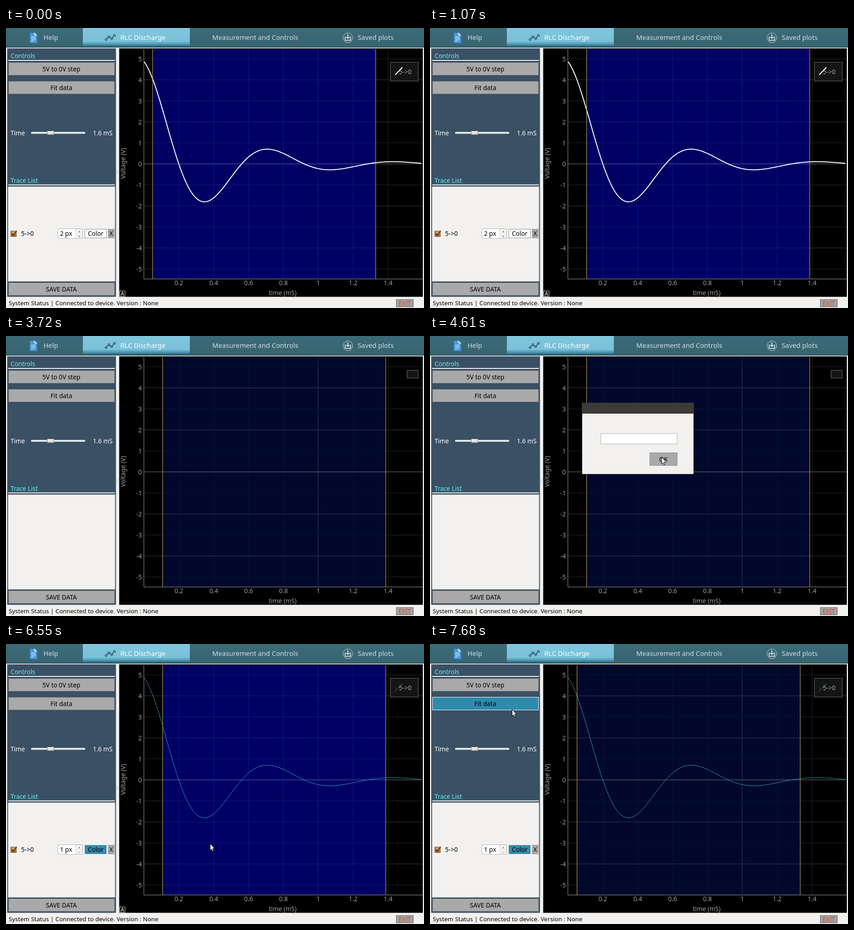
An HTML page with a canvas that plays this animation: 914 px wide and 613 px high, repeating every 8000 ms.

```html
<!DOCTYPE html>
<html lang="en">
<head>
<meta charset="utf-8">
<title>RLC Discharge</title>
<style>
html, body { margin: 0; width: 100%; height: 100%; overflow: hidden; background: #f2f1f0; }
canvas { display: block; width: 914px; height: 613px; }
</style>
</head>
<body>
<canvas id="stage" width="914" height="613"></canvas>
<script>
const LOOP = 8000;
const ctx = document.getElementById('stage').getContext('2d');
const FACE = '"Noto Sans", "Open Sans", sans-serif';
const PLOT = { left: 302, right: 911, top: 46, bottom: 549 };
const REGION_WIDTH = 488;
const TEAL = '#2e8bae';
const GREY = '#a9a9a9';

const toX = ms => 301.8 + 381.1 * ms;
const toY = volts => 297.7 - 46 * volts;
const mix = (a, b, k) => a + (b - a) * k;
const within = (t, from, to) => t >= from && t < to;

// Share of a move done after n equal jumps between two times.
function steps(t, from, to, n) {
  if (t < from) return 0;
  const done = Math.floor((t - from) / (to - from) * (n - 1) + 1.001);
  return Math.min(done, n) / n;
}

function rect(x, y, w, h, fill, edge) {
  ctx.fillStyle = fill;
  ctx.fillRect(x, y, w, h);
  if (edge) {
    ctx.strokeStyle = edge;
    ctx.lineWidth = 1;
    ctx.strokeRect(x + 0.5, y + 0.5, w - 1, h - 1);
  }
}

function text(str, x, y, color, size = 13.6, align = 'left') {
  ctx.font = `${size}px ${FACE}`;
  ctx.textAlign = align;
  ctx.fillStyle = color;
  ctx.fillText(str, x, y);
}

function path(points, color, width = 1, fill) {
  ctx.beginPath();
  points.forEach(([x, y]) => ctx.lineTo(x, y));
  if (fill) {
    ctx.closePath();
    ctx.fillStyle = fill;
    ctx.fill();
  }
  ctx.strokeStyle = color;
  ctx.lineWidth = width;
  ctx.stroke();
}

function fade(y0, y1, from, to) {
  const g = ctx.createLinearGradient(0, y0, 0, y1);
  g.addColorStop(0, from);
  g.addColorStop(1, to);
  return g;
}

// Damped oscillation of the circuit, t in ms.
function voltage(t) {
  const s = t + 0.014, w = 8.72, a = 2.6;
  const ring = Math.exp(-a * s) * (Math.cos(w * s) + a / w * Math.sin(w * s));
  return 4.6 * ring + 0.31 * Math.exp(-t / 0.05);
}

function cursorAt(t) {
  if (t < 3840) return null;
  if (t < 6500) {
    const k = steps(t, 4190, 4830, 14);
    return k < 0.8
      ? [mix(404, 531, k / 0.8), mix(218, 277, k / 0.8)]
      : [mix(531, 517, (k - 0.8) / 0.2), mix(277, 260, (k - 0.8) / 0.2)];
  }
  if (t < 6700) {
    const k = steps(t, 6500, 6550, 2);
    return [mix(517, 446, k), mix(260, 437, k)];
  }
  if (t < 7320) {
    const k = steps(t, 6700, 7070, 8);
    return [mix(462, 441, k), mix(437, 432, k)];
  }
  const k = steps(t, 7320, 7680, 8);
  return [mix(441, 179, k), mix(432, 143, k)];
}

function stateAt(t) {
  const cursor = cursorAt(t);
  const late = t >= 5960;
  const left = 320.5 + 22 * steps(t, 480, 690, 5) - 21 * steps(t, 6700, 7070, 8);
  return {
    cursor, late, left,
    traced: t < 2470 || late,
    hot: t < 690 || within(t, 1070, 1260) || within(t, 5960, 7120) ||
      (t >= 7320 && cursor[0] > left),
    auto: t < 1320 || (late && cursor[0] > 248),
    stepHot: within(t, 3280, 3720),
    fitHot: within(t, 3080, 3230) || (late && cursor[0] < 238 && cursor[1] < 145),
    closeHot: within(t, 1710, 2470),
    closeDown: within(t, 1790, 1870)
  };
}

function drawHeader() {
  rect(0, 0, 914, 43, fade(0, 43, '#3c6a79', '#386470'));
  rect(0, 41, 914, 2, '#315b66');
  rect(168, 0, 234, 34, fade(0, 34, '#7fc6dd', '#79c0d8'));
  rect(168, 30, 234, 8, fade(30, 38, '#74bad2', '#3c87a3'));
  rect(168, 38, 234, 2, '#336f84');

  path([[52, 10], [62, 10], [68, 16], [68, 33], [52, 33]], '#2c6fa8', 1, '#4b9ad6');
  path([[62, 10], [62, 16], [68, 16]], '#d2e8f7', 1, '#a5d0ee');
  for (let y = 19.5; y < 31; y += 3) path([[55, y], [y > 27 ? 61 : 65, y]], '#e8f4fc');
  text('Help', 82, 26, '#d2dcdf', 14.67);

  const dots = [[219, 25], [225, 19], [231, 23], [237, 16]];
  path(dots, '#18333e', 1.2);
  for (const [x, y] of dots) {
    ctx.beginPath();
    ctx.arc(x, y, 2, 0, 7);
    ctx.fillStyle = '#7cc3da';
    ctx.fill();
    ctx.stroke();
  }
  text('RLC Discharge', 250, 26, '#ffffff', 14.67);
  text('Measurement and Controls', 451, 26, '#d2dcdf', 14.67);

  ctx.beginPath();
  ctx.arc(747.5, 21.5, 10.5, 0, 7);
  ctx.strokeStyle = '#c6d3d7';
  ctx.lineWidth = 1;
  ctx.stroke();
  path([[744, 20], [741.5, 20], [741.5, 27], [753.5, 27], [753.5, 20], [751, 20]], '#f0f5f6', 1.5);
  path([[747.5, 14], [747.5, 22]], '#f0f5f6', 1.8);
  path([[744.5, 20.5], [750.5, 20.5], [747.5, 24]], '#f0f5f6', 0.5, '#f0f5f6');
  text('Saved plots', 769, 26, '#d2dcdf', 14.67);
}

function button(label, y, hot) {
  rect(5, y, 233, 29, hot ? TEAL : GREY, hot ? '#ffffff' : '#59626b');
  text(label, 121, y + 19.5, '#000000', 13.6, 'center');
}

function drawRow(s) {
  rect(10, 444, 13, 13, fade(444, 457, '#e5a764', '#b96f2e'), '#70421c');
  path([[12.5, 450], [16, 454], [23.5, 444]], '#3c2413', 2);
  text('5->0', 33, 455, '#000000');

  rect(113, 439, 55, 22, '#ffffff', '#b5b1ac');
  rect(153, 440, 14, 20, '#f4f3f2');
  path([[152.5, 440], [152.5, 460]], '#dedbd8');
  path([[158, 447], [160, 444.5], [162, 447]], '#7a7773', 0.5, '#7a7773');
  const down = s.late ? '#c2bfbb' : '#7a7773';
  path([[158, 455], [160, 457.5], [162, 455]], down, 0.5, down);
  text(s.late ? '1 px' : '2 px', 118, 455, '#000000');

  rect(172, 440, 48, 20, s.late ? TEAL : '#ffffff', s.late ? '#7f9aa5' : '#8b8b8b');
  text('Color', 196, 455, '#000000', 13.6, 'center');

  const fill = s.closeDown ? '#1f6d8c' : s.closeHot ? TEAL : GREY;
  rect(223, 440, 14, 20, fill, '#8f8f8f');
  text('X', 230, 455, '#000000', 13.6, 'center');
}

function drawPanel(s) {
  rect(2.5, 44.5, 238, 544, '#3a5064');
  text('Controls', 10, 66, '#62f4f4');
  rect(5, 70, 233, 2, '#f4f4f4');
  button('5V to 0V step', 75, s.stepHot);
  button('Fit data', 116, s.fitHot);

  text('Time', 10, 235, '#ffffff');
  rect(55, 227.5, 118, 4, '#e9eef1');
  rect(90, 225, 15, 9, fade(225, 234, '#ffffff', '#c9c5c1'), '#8b8782');
  text('1.6 mS', 233, 235, '#ffffff', 13.6, 'right');

  text('Trace List', 10, 339, '#62f4f4');
  rect(5, 342.5, 233, 2, '#f4f4f4');
  rect(4.5, 347, 234, 208, '#f2f1f0', '#c4cbd0');
  if (s.traced) drawRow(s);
  button('SAVE DATA', 557, false);

  for (let y = 313; y < 322; y += 3) {
    path([[242, y + 0.5], [246, y + 0.5]], '#c5c1bd');
  }
}

function drawGrid(s, inside) {
  const shades = !inside ? ['#252525', '#3a3a3a', '#747474']
    : s.hot ? ['#15157a', '#1c1c7c', '#6060ac']
    : ['#061242', '#323a4c', '#6c7478'];
  for (let i = 1; i <= 7; i++) {
    const x = Math.floor(toX(i / 5)) + 0.5;
    path([[x, PLOT.top], [x, PLOT.bottom]], shades[i === 5 ? 1 : 0]);
  }
  for (let v = -5; v <= 5; v++) {
    const y = Math.floor(toY(v)) + 0.5;
    path([[PLOT.left, y], [PLOT.right, y]], shades[v === 0 ? 2 : v % 2 ? 0 : 1]);
  }
}

function drawTrace(s) {
  const points = [];
  for (let x = 302; x <= 909; x += 3) points.push([x, toY(voltage((x - 301.8) / 381.1))]);
  ctx.lineJoin = 'round';
  path(points, s.late ? '#329bb5' : '#ffffff', s.late ? 1 : 2);
  ctx.lineJoin = 'miter';
}

function drawLegend(s) {
  if (!s.traced) {
    rect(876.5, 74.5, 25, 18, '#141414', '#707070');
    return;
  }
  rect(840, 74.5, 62, 42, '#141414', '#707070');
  text('5->0', 859, 101, '#a8a8a8');
  path([[851, 102.5], [867, 86]], s.late ? '#329bb5' : '#ffffff', s.late ? 1 : 2);
}

function drawPlot(s) {
  rect(247.5, 44.5, 664, 544, '#000000');
  drawGrid(s, false);

  const right = s.left + REGION_WIDTH;
  ctx.save();
  ctx.beginPath();
  ctx.rect(s.left, PLOT.top, REGION_WIDTH, PLOT.bottom - PLOT.top);
  ctx.clip();
  rect(s.left, PLOT.top, REGION_WIDTH, 503, s.hot ? '#000064' : '#02082c');
  drawGrid(s, true);
  ctx.restore();

  if (s.traced) drawTrace(s);
  for (const edge of [s.left, right]) {
    const x = Math.floor(edge) + 0.5;
    path([[x, PLOT.top], [x, PLOT.bottom]], '#c4b564');
  }

  path([[301.5, PLOT.top], [301.5, 549.5], [PLOT.right, 549.5]], '#969696');
  for (let v = -5; v <= 5; v++) text(String(v), 297, toY(v) + 4.8, '#a0a0a0', 13.6, 'right');
  for (let i = 1; i <= 7; i++) text(String(i / 5), toX(i / 5), 563, '#a0a0a0', 13.6, 'center');
  text('time (mS)', 605, 585, '#a0a0a0', 13.6, 'center');
  ctx.save();
  ctx.translate(261, 296.5);
  ctx.rotate(-Math.PI / 2);
  text('Voltage (V)', 0, 0, '#a0a0a0', 13.6, 'center');
  ctx.restore();

  drawLegend(s);
  if (s.auto) {
    rect(248, 575, 13, 13, '#101010', '#b4b4b4');
    text('A', 254.5, 586, '#f0f0f0', 12, 'center');
  }
}

function drawStatus() {
  text('System Status | Connected to device. Version : None', 6, 607, '#000000', 13.33);
  rect(853, 594, 38, 17, '#a5a5a5', '#555555');
  text('EXIT', 872, 607.5, '#c9492a', 13.6, 'center');
}

function drawDialog(t) {
  if (!within(t, 3840, 5380)) return;
  rect(332, 146, 245, 157, '#f2f1f0', '#3c3b37');
  rect(332, 146, 245, 24, '#3c3b37');
  if (t < 3890) return;
  const named = t >= 5180;
  rect(373, 213, 168, 24, '#ffffff', named ? TEAL : '#b5b1ac');
  if (named) text('5->0', 380, 230, '#000000');
  rect(480, 255, 61, 29, t >= 5320 ? TEAL : GREY, '#8f8f8f');
  text('OK', 510.5, 274.5, '#000000', 13.6, 'center');
}

function drawCursor(pos) {
  if (!pos) return;
  ctx.save();
  ctx.translate(Math.round(pos[0]), Math.round(pos[1]));
  path([[0.5, 0], [0.5, 15], [3.5, 12], [5.6, 17], [8, 16], [5.9, 11.2], [10, 10.8]],
    '#000000', 1, '#ffffff');
  ctx.restore();
}

function draw(t) {
  const s = stateAt(t);
  rect(0, 0, 914, 613, '#f2f1f0');
  drawHeader();
  rect(0, 43, 914, 2, '#ffffff');
  drawPanel(s);
  drawPlot(s);
  drawStatus();
  drawDialog(t);
  drawCursor(s.cursor);
}

const start = performance.now();
function tick() {
  draw((performance.now() - start) % LOOP);
  requestAnimationFrame(tick);
}
tick();
</script>
</body>
</html>
```
